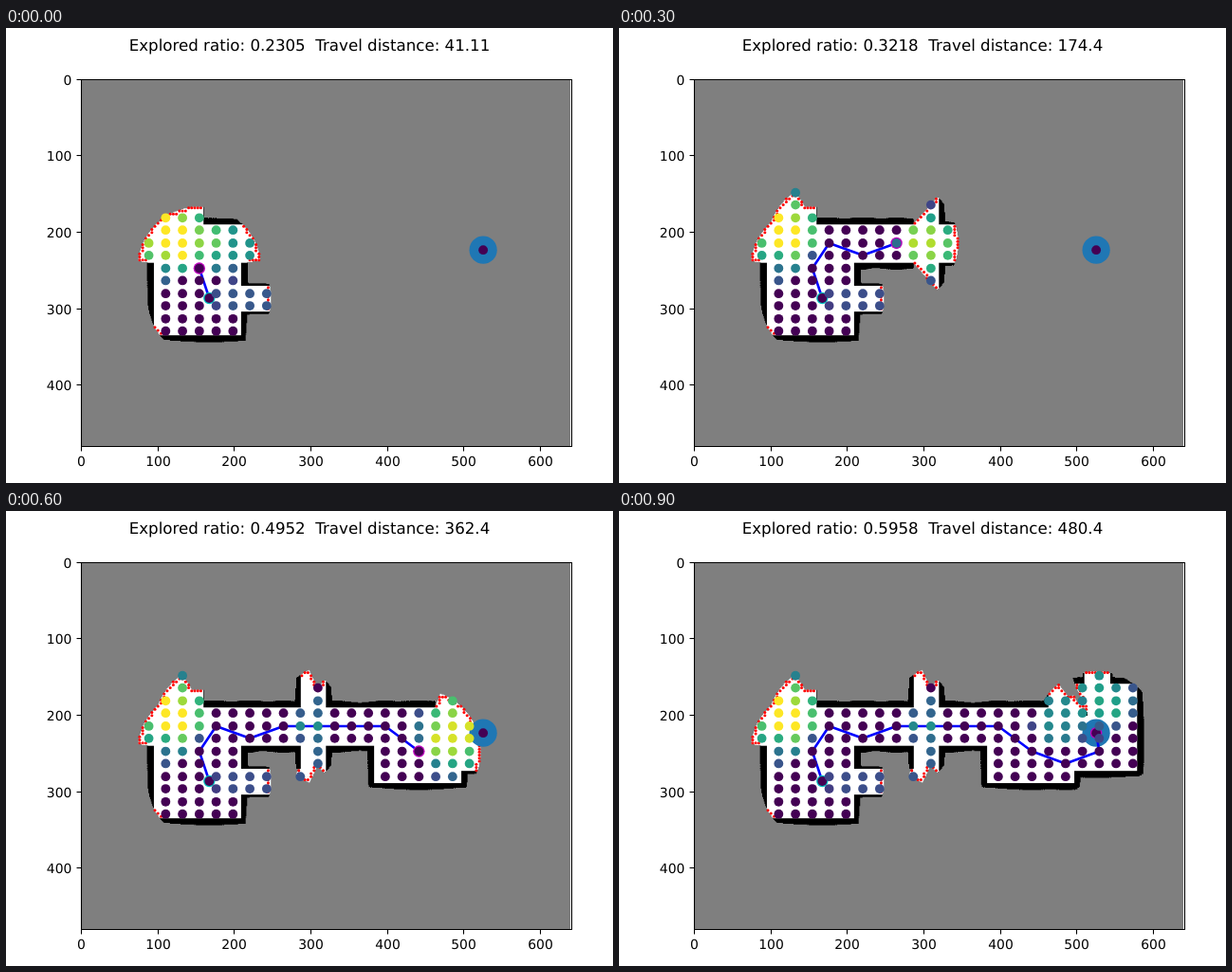
These frames come from a looping animation (640x480 px, 1 s). An HTML page with a canvas:

```html
<!DOCTYPE html>
<html lang="en">
<head>
<meta charset="utf-8">
<title>Exploration map</title>
<style>
  html, body { margin: 0; width: 100%; height: 100%; overflow: hidden; background: #fff; }
  canvas, svg { position: absolute; left: 0; top: 0; width: 640px; height: 480px; }
  text { font: 13.89px "DejaVu Sans", sans-serif; white-space: pre; text-rendering: geometricPrecision; }
  #title { font-size: 16.67px; text-anchor: middle; }
</style>
</head>
<body>
<canvas id="view" width="640" height="480"></canvas>
<svg id="labels" viewBox="0 0 640 480"><text id="title" x="320" y="24"></text></svg>
<script>
const W = 640, H = 480, STEP = 100;
const SIGHT = 80, REACH = 70, DEPTH = 8, CELL = 4, FEW = 5;
const UNKNOWN = 0, WALL = 1, FREE = 2;
const SHADES = [127, 0, 255];
const SCALE = 0.8067;
const X = u => 79.2 + SCALE * (u + 0.5);
const Y = v => 53.9 + SCALE * (v + 0.5);

// floor plan in map units: left, top, right, bottom
const rooms = [
  [40, 90, 160, 240],    // north-west hall
  [95, 239, 209, 335],   // first room
  [209, 270, 300, 304],  // side passage
  [95, 190, 579, 240],   // main corridor
  [287, 120, 320, 310],  // crossing
  [383, 190, 497, 289],  // second room
  [463, 159, 579, 273],  // last room
  [510, 120, 544, 160]   // north door
];
const pillar = [508, 196, 514, 201];

const within = (x, y, [l, t, r, b]) => x >= l && x < r && y >= t && y < b;
const isOpen = (x, y) => !within(x, y, pillar) && rooms.some(r => within(x, y, r));

// lattice of way points
const node = (col, row) => [Math.floor(88.3 + 22.07 * col), Math.floor(148 + 16.5 * row)];
const start = [167, 286], goal = [525, 223];
const stops = [[3, 6], [4, 4], [6, 5], [8, 4], [11, 4], [14, 4], [16, 6], [18, 7], [20, 6]]
  .map(p => node(...p)).concat([goal]);
const ratios = [0.2305, 0.2534, 0.278, 0.3218, 0.3696, 0.447, 0.4952, 0.5375, 0.5764, 0.5958];
const gap = (a, b) => Math.hypot(a[0] - b[0], a[1] - b[1]);

const viridis = ["440154", "482878", "3e4a89", "31688e", "26828e",
  "1f9e89", "35b779", "6dcd59", "b4de2c", "fde725"]
  .map(h => [0, 2, 4].map(i => parseInt(h.slice(i, i + 2), 16)));

function tint(f) {
  const p = f * (viridis.length - 1), i = Math.min(Math.floor(p), viridis.length - 2);
  return `rgb(${viridis[i].map((c, k) => Math.round(c + (viridis[i + 1][k] - c) * (p - i)))})`;
}

// reveal what a range sensor sees, including a thin skin of the walls it hits
function scan(map, [px, py]) {
  const rays = 1800;
  for (let k = 0; k < rays; k++) {
    const a = 2 * Math.PI * k / rays, dx = Math.cos(a), dy = Math.sin(a);
    for (let r = 0, depth = 0; r <= SIGHT && depth <= DEPTH; r += 0.5) {
      const x = Math.round(px + r * dx), y = Math.round(py + r * dy);
      const open = isOpen(x, y);
      if (open && depth) break;
      map[y * W + x] = open ? FREE : WALL;
      if (!open) depth += 0.5;
    }
  }
}

// first cell that is not free on the way from a to b, or FREE
function probe(map, a, b) {
  const n = Math.ceil(gap(a, b));
  for (let i = 1; i <= n; i++) {
    const x = Math.round(a[0] + (b[0] - a[0]) * i / n);
    const y = Math.round(a[1] + (b[1] - a[1]) * i / n);
    if (map[y * W + x] !== FREE) return map[y * W + x];
  }
  return FREE;
}

function findFrontier(map) {
  const found = [];
  for (let y = CELL; y < H - CELL; y += CELL)
    for (let x = CELL; x < W - CELL; x += CELL) {
      if (map[y * W + x] !== FREE) continue;
      let open = 0;
      for (let j = -CELL; j <= CELL; j += CELL)
        for (let i = -CELL; i <= CELL; i += CELL)
          if ((i || j) && probe(map, [x, y], [x + i, y + j]) === UNKNOWN) open++;
      if (open > 1) found.push([x, y]);
    }
  return found;
}

// way points on known ground, each with the frontier cells it can see
function findNodes(map, frontier) {
  const list = [];
  for (let col = 0; col < 23; col++)
    for (let row = 0; row < 12; row++) {
      const p = node(col, row);
      if (map[p[1] * W + p[0]] !== FREE) continue;
      const seen = frontier.filter(f => gap(p, f) < REACH && probe(map, p, f) === FREE).length;
      list.push({ p, gain: seen > FEW ? seen : 0 });
    }
  return list;
}

function canvas() {
  return Object.assign(document.createElement("canvas"), { width: W, height: H });
}

function mapImage(map) {
  const c = canvas(), g = c.getContext("2d"), img = g.createImageData(W, H);
  map.forEach((s, i) => {
    img.data.fill(SHADES[s], i * 4, i * 4 + 3);
    img.data[i * 4 + 3] = 255;
  });
  g.putImageData(img, 0, 0);
  return c;
}

function paint(map, n) {
  const c = canvas(), g = c.getContext("2d");
  const dot = ([u, v], r, fill) => {
    g.fillStyle = fill;
    g.beginPath();
    g.arc(X(u), Y(v), r, 0, 2 * Math.PI);
    g.fill();
  };
  const frontier = findFrontier(map), nodes = findNodes(map, frontier);
  const most = Math.max(1, ...nodes.map(d => d.gain));

  g.drawImage(mapImage(map), 79.2, 54, W * SCALE, H * SCALE);
  frontier.forEach(p => dot(p, 1.5, "#f00"));
  dot(goal, 14.6, "#1f77b4");

  g.strokeStyle = "#00f";
  g.lineWidth = 2.6;
  g.lineJoin = "round";
  g.beginPath();
  [start, ...stops.slice(0, n + 1)].forEach(([u, v]) => g.lineTo(X(u), Y(v)));
  g.stroke();

  dot(start, 6.2, "#00bfbf");
  dot(stops[n], 6.2, "#bf00bf");
  [start, goal].forEach(p => dot(p, 4.9, tint(0)));
  nodes.forEach(d => dot(d.p, 4.9, tint(d.gain / most)));
  return c;
}

function explore() {
  const map = new Uint8Array(W * H);
  let at = start, dist = 0;
  scan(map, start);
  return stops.map((p, n) => {
    dist += gap(at, p);
    at = p;
    scan(map, p);
    const title = `Explored ratio: ${ratios[n]}  Travel distance: ${+dist.toPrecision(4)}`;
    return { title, image: paint(map, n) };
  });
}

function drawAxes() {
  const svg = document.getElementById("labels");
  const add = (tag, attrs, text = "") => {
    const el = document.createElementNS("http://www.w3.org/2000/svg", tag);
    for (const k in attrs) el.setAttribute(k, attrs[k]);
    el.textContent = text;
    svg.appendChild(el);
  };
  const line = d => add("path", { d, fill: "none", stroke: "#000", "stroke-width": 1.1 });
  line("M79.5 54.5H596.5V441.5H79.5Z");
  for (let v = 0; v <= 600; v += 100) {
    const x = Math.floor(X(v)) + 0.5, y = Math.floor(Y(v)) + 0.5;
    line(`M${x} 442v4.5`);
    add("text", { x, y: 462, "text-anchor": "middle" }, v);
    if (v > 400) continue;
    line(`M79 ${y}h-4.5`);
    add("text", { x: 69.3, y: y + 5, "text-anchor": "end" }, v);
  }
}

drawAxes();
const steps = explore();
const pen = document.getElementById("view").getContext("2d");
const title = document.getElementById("title");
const begin = performance.now();

function show() {
  const now = steps[Math.floor((performance.now() - begin) / STEP) % steps.length];
  pen.clearRect(0, 0, W, H);
  pen.drawImage(now.image, 0, 0);
  title.textContent = now.title;
  requestAnimationFrame(show);
}
show();
</script>
</body>
</html>
```
